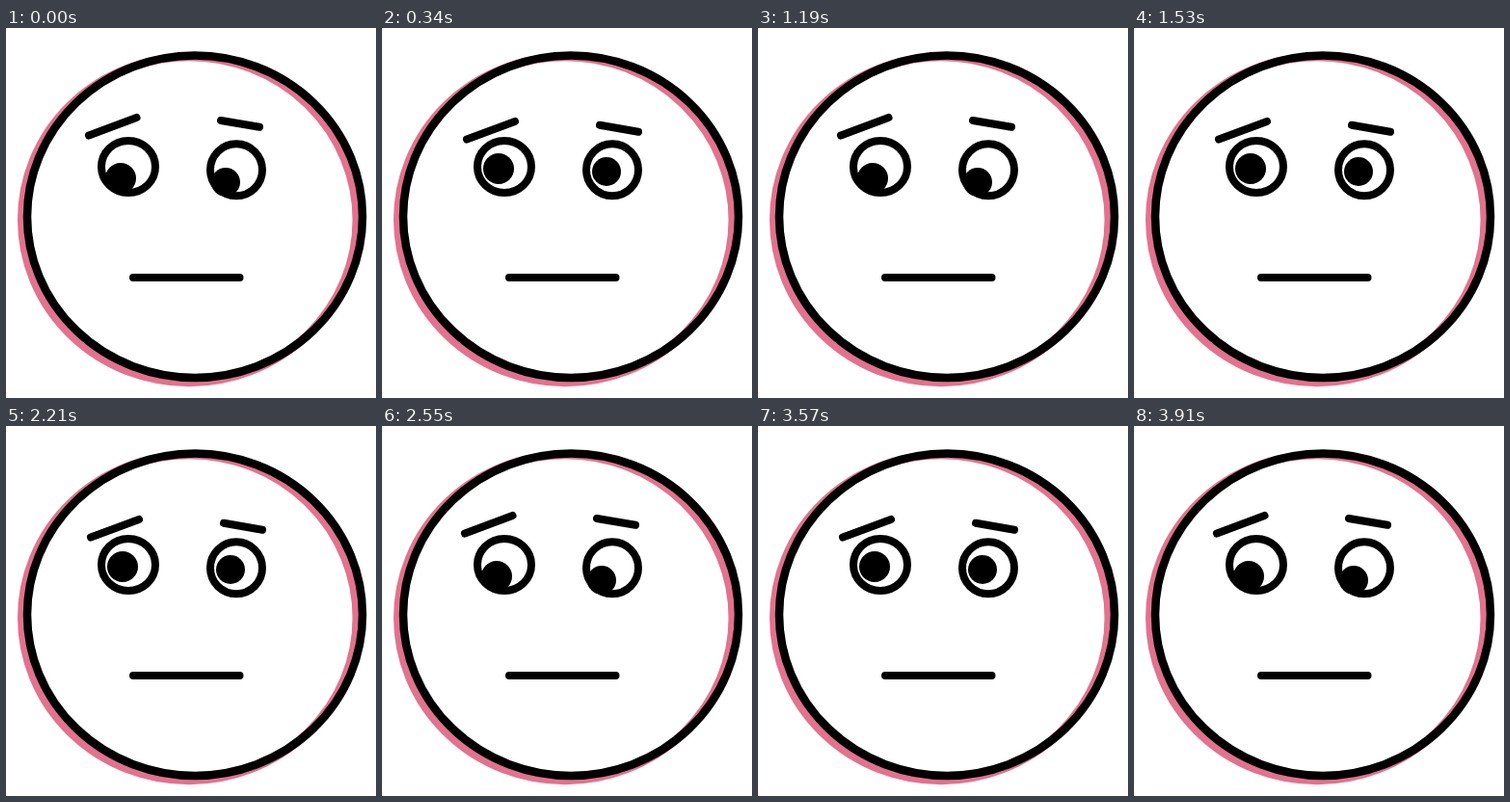
These frames come from a looping animation (384 by 384 pixels, 4080 ms). An HTML page with a canvas:

```html
<!DOCTYPE html>
<html lang="en">
<head>
<meta charset="utf-8">
<title>Doubtful face</title>
<style>
  html, body { margin: 0; width: 100%; height: 100%; overflow: hidden; background: #fff; }
  canvas { display: block; width: 384px; height: 384px; }
</style>
</head>
<body>
<canvas id="stage" width="384" height="384"></canvas>
<script>
const ctx = document.getElementById('stage').getContext('2d');
const STEP = 170;
const INK = '#000', PINK = '#e2728f';

// Each pose: brow lines and pupil discs
const glance = {
  brows: [[86, 111.5, 135.5, 93], [223, 96, 263, 102.8]],
  pupils: [[119, 156, 16], [228, 160, 15]]
};
const stare = {
  brows: [[88, 115.5, 138, 97], [226, 100.7, 266, 107.7]],
  pupils: [[121, 146, 16], [233, 149, 15]]
};
const cycle = [glance, stare, stare, glance];

function ring(x, y, rx, ry, width, color = INK) {
  ctx.beginPath();
  ctx.ellipse(x, y, rx, ry, 0, 0, Math.PI * 2);
  ctx.lineWidth = width;
  ctx.strokeStyle = color;
  ctx.stroke();
}

function disc(x, y, r) {
  ctx.beginPath();
  ctx.arc(x, y, r, 0, Math.PI * 2);
  ctx.fillStyle = INK;
  ctx.fill();
}

function bar(x1, y1, x2, y2) {
  ctx.beginPath();
  ctx.moveTo(x1, y1);
  ctx.lineTo(x2, y2);
  ctx.lineWidth = 8;
  ctx.lineCap = 'round';
  ctx.strokeStyle = INK;
  ctx.stroke();
}

function draw(pose) {
  ctx.fillStyle = '#fff';
  ctx.fillRect(0, 0, 384, 384);
  ring(190, 199, 173.8, 169, 8.5, PINK);
  ring(196, 195.7, 174, 167.2, 8.5);
  pose.pupils.forEach(p => disc(...p));
  ring(127, 144, 28, 27, 8);
  ring(239, 147.3, 27, 27, 8);
  pose.brows.forEach(b => bar(...b));
  bar(132, 259, 242.5, 259);
}

const start = performance.now();
function tick() {
  const step = Math.floor((performance.now() - start) / STEP);
  draw(cycle[step % cycle.length]);
  requestAnimationFrame(tick);
}
tick();
</script>
</body>
</html>
```
